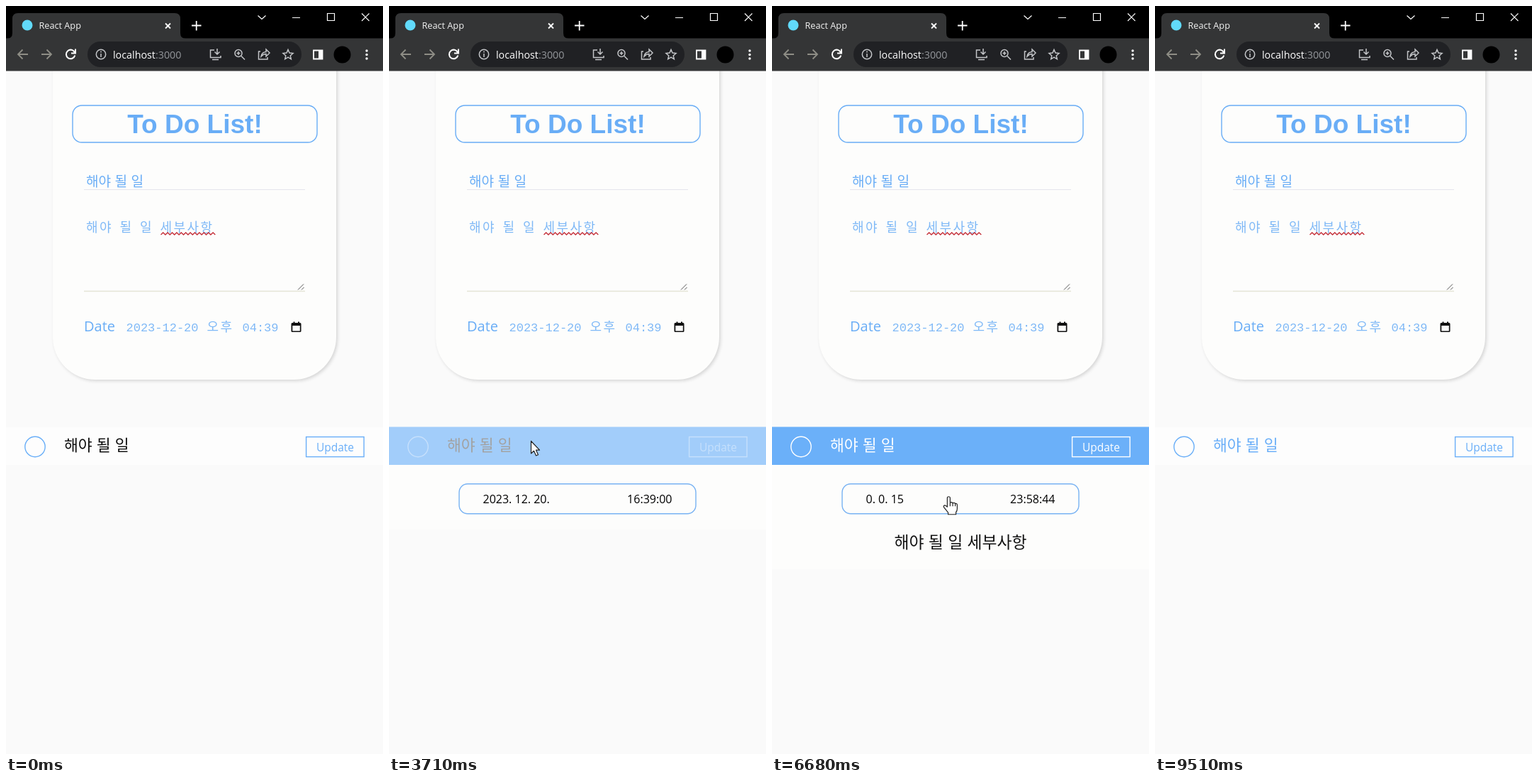
An HTML page that plays this animation: 532x1053 px, repeating every 9590 ms.

```html
<!DOCTYPE html>
<html lang="ko">
<head>
<meta charset="utf-8">
<title>To Do List</title>
<style>
  html, body { margin: 0; width: 100%; height: 100%; overflow: hidden; background: #fafafa; }
  svg { display: block; width: 100vw; height: 100vh; }
  text { font-family: "Open Sans", "Noto Sans", sans-serif; white-space: pre; }
  .ko { font-family: "Noto Sans CJK KR", "Noto Sans CJK JP", "Noto Sans CJK", sans-serif; }
  .thin { font-weight: 300; font-size: 18px; letter-spacing: 2.4px; }
  .mono { font-family: "Liberation Mono", monospace; font-size: 17px; }
  .thin, .mono { opacity: .85; }
  .title { font: bold 37px "Liberation Sans", Arial, sans-serif; }
  .card { filter: drop-shadow(2px 2px 2px #d6d6d6); }
  .line { fill: none; stroke-width: 1.4; }
</style>
</head>
<body>
<svg viewBox="0 0 532 1053" preserveAspectRatio="none">
  <defs>
    <clipPath id="panelClip"><rect id="panelArea" y="646" width="532" height="0"/></clipPath>
    <clipPath id="boxClip"><rect x="90" y="670" width="352" height="49.5"/></clipPath>
  </defs>
  <rect width="532" height="1053" fill="#fafafa"/>

  <!-- form card -->
  <path class="card" fill="#fdfdfc" d="M66 60H466V466a60 60 0 0 1-60 60H126a60 60 0 0 1-60-60Z"/>
  <g fill="#69adf6">
    <rect x="94" y="140" width="345" height="52" rx="13" class="line" stroke="#69adf6"/>
    <text class="title" x="266.5" y="179" text-anchor="middle">To Do List!</text>
    <text class="ko" x="113" y="253.5" font-size="19.1">해야 될 일</text>
    <text class="ko thin" x="113" y="318">해야</text>
    <text class="ko thin" x="160.5" y="318">될</text>
    <text class="ko thin" x="189" y="318">일</text>
    <text class="ko thin" x="217.5" y="318">세부사항</text>
    <text x="110" y="458" font-size="20">Date</text>
    <text class="mono" x="169.5" y="458">2023-12-20</text>
    <text class="ko thin" x="283.5" y="458">오후</text>
    <text class="mono" x="333.5" y="458">04:39</text>
  </g>
  <path stroke="#e5e5ec" d="M110 258.5H422"/>
  <path stroke="#e4e4d6" stroke-width="1.5" d="M110 401.5H422"/>
  <path id="squiggle" fill="none" stroke="#c4303a" stroke-width="1.4"/>
  <path stroke="#555" d="M412 399.5l8-8M417 399.5l3.5-3.5"/>
  <path fill="#111" fill-rule="evenodd" d="M404 446h1.5v-1.5h2v1.5h4.5v-1.5h2v1.5h1a1.5 1.5 0 0 1 1.5 1.5v10a1.5 1.5 0 0 1-1.5 1.5h-11a1.5 1.5 0 0 1-1.5-1.5v-10a1.5 1.5 0 0 1 1.5-1.5ZM404.3 450v7.5h10.5V450Z"/>

  <!-- to-do item -->
  <rect y="593" width="532" height="53" fill="#fdfdfd"/>
  <rect id="rowFill" y="592.5" width="532" height="53.5" fill="#6bb0f9"/>
  <g id="controls" class="line" stroke="#69aef8">
    <circle cx="41" cy="620.5" r="14.2"/>
    <rect x="423.6" y="606.6" width="81.5" height="28"/>
  </g>
  <text id="updateLabel" x="464.5" y="627" font-size="15.5" text-anchor="middle">Update</text>
  <text id="itemLabel" class="ko" x="82" y="625.5" font-size="21.6">해야 될 일</text>

  <g clip-path="url(#panelClip)">
    <rect y="646" width="532" height="147" fill="#fdfdfc"/>
    <g clip-path="url(#boxClip)">
      <g id="dateBox">
        <rect x="99" y="672.7" width="334" height="42" rx="12" class="line" stroke="#78b2f3"/>
        <text id="dateLabel" x="132.5" y="700" font-size="16"></text>
        <text id="timeLabel" x="399.5" y="700" font-size="16" text-anchor="end"></text>
      </g>
    </g>
    <text class="ko" x="266" y="763" font-size="22.8" text-anchor="middle" fill="#111">해야 될 일 세부사항</text>
  </g>

  <!-- browser window -->
  <rect width="532" height="46" fill="#000"/>
  <rect y="45.5" width="532" height="46" fill="#343536"/>
  <path fill="#343536" d="M1 46q8 0 8-8V18q0-8 8-8H238q8 0 8 8v20q0 8 8 8Z"/>
  <rect x="115" y="50" width="302" height="36" rx="18" fill="#202124"/>
  <circle cx="30" cy="27" r="7.5" fill="#61dafb"/>
  <text x="46.5" y="32" font-size="12.7" fill="#f4f4f4">React App</text>
  <text x="151" y="73.5" font-size="14.3" fill="#fff">localhost<tspan fill="#94979b">:3000</tspan></text>
  <g fill="none" stroke="#fff" stroke-width="1.2">
    <path d="M355.5 13.5l5.5 5 5.5-5M404 16.5h11M453.5 10.5h10v10h-10ZM502 10.5l10.5 10.5m0-10.5L502 21"/>
    <path stroke-width="1.8" d="M225 24.5l7 7m0-7l-7 7M262 27.5h13.5M268.7 21v13.5"/>
    <path stroke="#8e8d85" stroke-width="1.8" d="M31 68H17m6.5-6.5L17 68l6.5 6.5M50 68h14m-6.5-6.5L64 68l-6.5 6.5"/>
    <path stroke-width="2" d="M97 65.5a6.3 6.3 0 1 0 .3 4M98 60.5v6h-6"/>
    <g stroke="#c3c5c8" stroke-width="1.5">
      <path d="M134 67v5m0-8.5v2"/><circle cx="134" cy="68" r="6.7"/>
      <path d="M294 62h-5.5v10.5H303V70M291 75.5h9M298 60v8m-3.5-3.5l3.5 3.5 3.5-3.5"/>
      <circle cx="328" cy="66.5" r="5"/><path d="M332 70.5l5 5M325.5 66.5h5M328 64v5"/>
      <path d="M359 64h-2.5v11H369v-3M360 71q1-6 7-6.5V61l5 5-5 5v-3.5q-4 0-7 3.5Z"/>
      <path d="M398 61.5l2 4.6 5 .5-3.8 3.3 1.1 4.9-4.3-2.6-4.3 2.6 1.1-4.9-3.8-3.3 5-.5Z"/>
    </g>
    <path stroke-width="1.8" d="M434 62.5h12.5v12H434Z"/>
  </g>
  <rect x="441" y="62" width="6" height="13" fill="#fff"/>
  <circle cx="474.5" cy="68.5" r="12" fill="#000"/>
  <g fill="#fff"><circle cx="509" cy="63" r="1.7"/><circle cx="509" cy="68.5" r="1.7"/><circle cx="509" cy="74" r="1.7"/></g>

  <g id="pointer" fill="#fff" stroke="#222" stroke-width="1.2" stroke-linejoin="round">
    <path id="arrow" d="M.5.5V18l4-3.7 3 6.7 3-1.3-3-6.5h5Z"/>
    <path id="hand" d="M-2.2 14V2.5q0-2 2-2t2 2V9q2-1.5 3.7.5 2-1.2 3.5.7 2.8-.5 2.8 2.3v5q0 3-1.8 5v3H-1v-2.5L-7 15.5q-1-2.5 1.2-2.8 1.600 0 3.6 2.3ZM1.8 9v5M5.5 9.5V14M9 10.5V14"/>
  </g>
</svg>
<script>
const LOOP = 9590;
const OPEN_AT = 3450, CLOSE_AT = 7600, TOGGLE_MS = 450;
const HOVER_AT = 5090, LEAVE_AT = 6760, SLIDE_MS = 600;
const BLACK = [12, 12, 12], WHITE = [255, 255, 255], BLUE = [105, 174, 248];

// Pointer stops: time, x, y
const STOPS = [
  [1400, 52, 217], [2300, 200, 612], [4400, 200, 612], [5050, 250, 691],
  [6650, 250, 691], [7150, 210, 622], [8450, 210, 622], [9000, -20, 560]
];

const $ = id => document.getElementById(id);
const progress = (t, start, length) => Math.min(1, Math.max(0, (t - start) / length));
const smooth = p => p * p * (3 - 2 * p);
const lerp = (a, b, p) => a + (b - a) * p;
const mix = (a, b, p) => `rgb(${a.map((v, i) => Math.round(lerp(v, b[i], p)))})`;

$("squiggle").setAttribute("d", "M218.5 322" + "l3.2-3 3.2 3".repeat(12));

function drawItem(t) {
  const open = smooth(progress(t, OPEN_AT, TOGGLE_MS)) - smooth(progress(t, CLOSE_AT, TOGGLE_MS));
  $("rowFill").setAttribute("opacity", open);
  $("panelArea").setAttribute("height", 147 * open);
  $("controls").setAttribute("stroke", mix(BLUE, WHITE, open));
  $("updateLabel").setAttribute("fill", mix(BLUE, WHITE, open));
  $("itemLabel").setAttribute("fill", mix(t < CLOSE_AT ? BLACK : BLUE, WHITE, open));
}

function drawDate(t) {
  const hovered = t >= HOVER_AT && t < LEAVE_AT;
  const seconds = 45 - Math.floor((t - HOVER_AT) / 1000);
  $("dateLabel").textContent = hovered ? "0. 0. 15" : "2023. 12. 20.";
  $("timeLabel").textContent = hovered ? `23:58:${seconds}` : "16:39:00";
  const start = t < HOVER_AT ? -SLIDE_MS : hovered ? HOVER_AT : LEAVE_AT;
  const left = 1 - smooth(progress(t, start, SLIDE_MS));
  $("dateBox").setAttribute("transform", `translate(0 ${(47 * left).toFixed(2)})`);
}

function drawPointer(t) {
  const next = STOPS.findIndex(stop => stop[0] > t);
  const visible = next > 0;
  $("pointer").style.display = visible ? "" : "none";
  if (!visible) return;
  const [t0, x0, y0] = STOPS[next - 1], [t1, x1, y1] = STOPS[next];
  const p = smooth(progress(t, t0, t1 - t0));
  const x = lerp(x0, x1, p), y = lerp(y0, y1, p);
  const overBox = y > 672;
  $("pointer").setAttribute("transform", `translate(${x} ${y})`);
  $("arrow").style.display = overBox ? "none" : "";
  $("hand").style.display = overBox ? "" : "none";
}

function frame() {
  const t = performance.now() % LOOP;
  drawItem(t);
  drawDate(t);
  drawPointer(t);
  requestAnimationFrame(frame);
}
frame();
</script>
</body>
</html>
```
